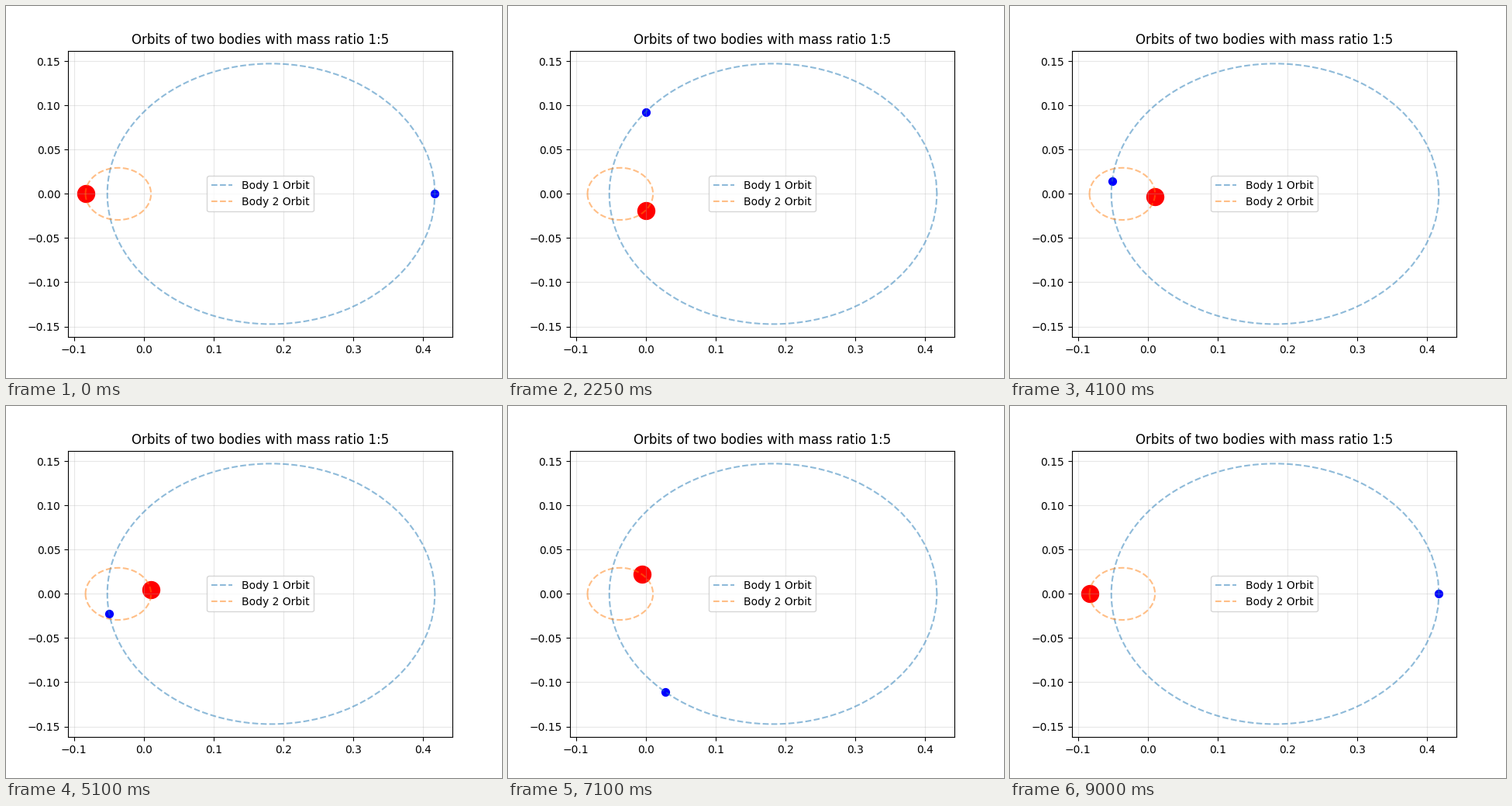
Write a matplotlib script that moves like this. It is 640 px wide and 480 px high and loops after 9050 ms.

```python
import numpy as np
import matplotlib.pyplot as plt
from matplotlib.animation import FuncAnimation

MASS_RATIO = 5
START_DISTANCE = 0.5
ECCENTRICITY = 7 / 9
STEPS = 181

# Body 1 starts at its farthest point; the focus is the centre of mass.
r_max = START_DISTANCE * MASS_RATIO / (MASS_RATIO + 1)
theta = np.linspace(0, 2 * np.pi, STEPS)
radius = r_max * (1 - ECCENTRICITY) / (1 - ECCENTRICITY * np.cos(theta))
body1 = np.column_stack([radius * np.cos(theta), radius * np.sin(theta)])
body2 = -body1 / MASS_RATIO

fig, ax = plt.subplots(figsize=(6.4, 4.8), dpi=100)
ax.plot(*body1.T, "--", alpha=0.5, label="Body 1 Orbit")
ax.plot(*body2.T, "--", alpha=0.5, label="Body 2 Orbit")
dot1 = ax.scatter(*body1[0], s=50, color="blue")
dot2 = ax.scatter(*body2[0], s=50 * MASS_RATIO, color="red")
ax.set_title(f"Orbits of two bodies with mass ratio 1:{MASS_RATIO}")
ax.grid(alpha=0.3)
ax.legend(loc="center")


def update(i):
    dot1.set_offsets(body1[i])
    dot2.set_offsets(body2[i])
    return dot1, dot2


anim = FuncAnimation(fig, update, frames=STEPS, interval=50,
                     repeat=True, repeat_delay=0)
plt.show()
```
